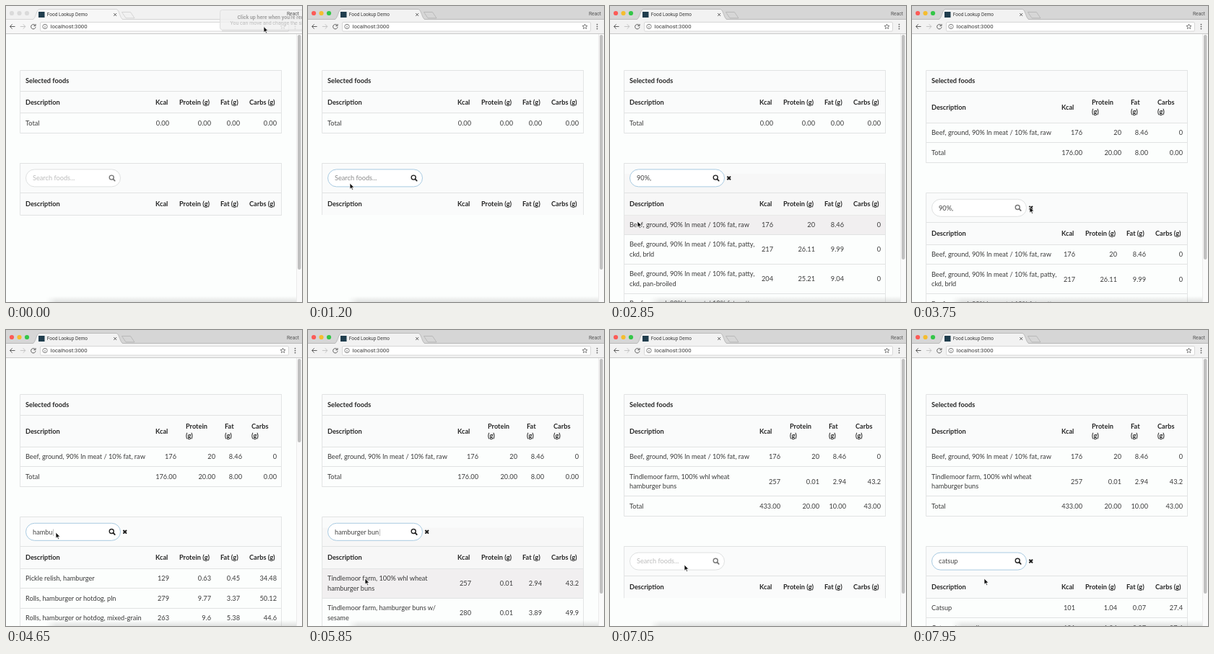
Write an HTML page that moves like this. It is 410x411 px and loops after 8 s.

```html
<!DOCTYPE html>
<html lang="en">
<head>
<meta charset="utf-8">
<title>Food Lookup Demo</title>
<style>
html, body { margin: 0; width: 100%; height: 100%; overflow: hidden; background: #fcfefd; }
svg { display: block; width: 410px; height: 411px; }
text { font: 9.2px Lato, sans-serif; fill: #3a3a3a; white-space: pre; }
text.b { font-weight: 700; fill: #262626; }
text.ui { font-family: Roboto, sans-serif; }
</style>
</head>
<body>
<svg id="stage" viewBox="0 0 410 411">
  <defs>
    <linearGradient id="dock" x2="0" y2="1">
      <stop offset="0" stop-color="#999" stop-opacity="0"/>
      <stop offset="1" stop-color="#999" stop-opacity=".28"/>
    </linearGradient>
    <linearGradient id="dockEdge">
      <stop offset="0" stop-color="#fcfefd"/>
      <stop offset="1" stop-color="#fcfefd" stop-opacity="0"/>
    </linearGradient>
  </defs>
  <g id="page"></g>
  <g id="dockShade">
    <rect x="55" y="403" width="347" height="8" fill="url(#dock)"/>
    <rect x="55" y="403" width="14" height="8" fill="url(#dockEdge)"/>
  </g>
  <g id="chrome"></g>
  <g id="note">
    <rect x="296.5" y="5.5" width="124" height="27.5" rx="3" fill="#f1f1f1" fill-opacity=".82" stroke="#dedede"/>
    <path d="M299 34.5H410" stroke="#000" stroke-opacity=".07" stroke-width="2"/>
    <text class="ui" x="320.5" y="18" style="font-size:7px;font-weight:700;fill:#a2a2a2">Click up here when you're ready</text>
    <text class="ui" x="310.5" y="26.3" style="font-size:7px;fill:#bcbcbc">You can move and change the size</text>
  </g>
  <text id="owner" class="ui" x="389" y="12.5" style="font-size:6.7px;fill:#555">React</text>
  <path id="cursor" d="M0 0V8.2L1.9 6.5 3.2 9.4 4.5 8.8 3.2 6H5.9Z" fill="#111" stroke="#fff" stroke-width=".7"/>
</svg>
<script>
const LOOP = 8000, STEP = 150;
const $ = id => document.getElementById(id);

const BEEF = "Beef, ground, 90% ln meat / 10% fat, ";
const foods = {
  beef: [
    [[BEEF + "raw"], "176", "20", "8.46", "0"],
    [[BEEF + "patty,", "ckd, brld"], "217", "26.11", "9.99", "0"],
    [[BEEF + "patty,", "ckd, pan-broiled"], "204", "25.21", "9.04", "0"],
    [[BEEF + "patty,", "raw"], "176", "20", "10", "0"]
  ],
  rolls: [
    [["Pickle relish, hamburger"], "129", "0.63", "0.45", "34.48"],
    [["Rolls, hamburger or hotdog, pln"], "279", "9.77", "3.37", "50.12"],
    [["Rolls, hamburger or hotdog, mixed-grain"], "263", "9.6", "5.38", "44.6"]
  ],
  buns: [
    [["Tindlemoor farm, 100% whl wheat", "hamburger buns"], "257", "0.01", "2.94", "43.2"],
    [["Tindlemoor farm, hamburger buns w/", "sesame"], "280", "0.01", "3.89", "49.9"]
  ],
  catsup: [
    [["Catsup"], "101", "1.04", "0.07", "27.4"],
    [["Catsup, low sodium"], "101", "1.04", "0.07", "27.4"]
  ]
};

const HEADS = ["Kcal", "Protein (g)", "Fat (g)", "Carbs (g)"];
const narrow = { left: [207, 240, 297, 337], right: [226, 284, 324, 375] };
const wide = { left: [207, 249, 303, 340], right: [236, 290, 327, 375] };
const LEAD = 13.4, LEFT = 19.5, RIGHT = 382;

// time, x, y of the pointer tip
const path = [
  [0, 357, 28.5], [150, 352, 36], [900, 60, 243], [1200, 58, 246], [2100, 58, 247],
  [2700, 38, 299], [3300, 38, 299], [3750, 163, 279], [3900, 163, 279], [4200, 69, 281],
  [5250, 69, 281], [5700, 79, 345], [6300, 79, 345], [6750, 163, 319], [6900, 163, 319],
  [7050, 103, 326], [7200, 92, 322], [7500, 92, 322], [7800, 100, 345], [8000, 100, 345]
];

// time, typed so far
const typing = [
  [0, ""], [1500, "9"], [1650, "90"], [1950, "90%"], [2100, "90%,"], [3900, ""],
  [4350, "ha"], [4500, "ham"], [4650, "hambu"], [4800, "hamburg"], [4950, "hamburger"],
  [5100, "hamburger b"], [5250, "hamburger bu"], [5400, "hamburger bun"], [6900, ""],
  [7350, "ca"], [7500, "cats"], [7650, "catsu"], [7800, "catsup"]
];

const within = (t, a, b) => t >= a && t < b;
const snap = y => Math.round(y - .5) + .5;
const rowHeight = n => 14 + LEAD * n;

function pointer(t) {
  const i = path.findLastIndex(p => p[0] <= t);
  const a = path[i], b = path[i + 1] || a;
  const u = a === b ? 0 : (t - a[0]) / (b[0] - a[0]);
  const e = u * u * (3 - 2 * u);
  return [a[1] + (b[1] - a[1]) * e, a[2] + (b[2] - a[2]) * e];
}

function resultsFor(q) {
  if (q.startsWith("90")) return foods.beef;
  if (q.startsWith("hamburger b")) return foods.buns;
  if (q.startsWith("ham")) return foods.rolls;
  if (q.startsWith("cat")) return foods.catsup;
  return [];
}

const text = (x, y, s, cls = "", extra = "") =>
  `<text x="${x}" y="${y + 3.2}" class="${cls}" ${extra}>${s}</text>`;
const box = (x, y, w, h, fill) =>
  `<rect x="${x}" y="${y}" width="${w}" height="${h}" fill="${fill}"/>`;
const line = (d, stroke, width = 1, extra = "") =>
  `<path d="${d}" fill="none" stroke="${stroke}" stroke-width="${width}" ${extra}/>`;
const rule = y => line(`M${LEFT} ${snap(y)}H${RIGHT}`, "#e1e3e3");
const band = (y, h, fill) => box(LEFT, y, RIGHT - LEFT, h, fill);
const sides = (a, b) => line(`M${LEFT} ${a}V${b}M${RIGHT - .5} ${a}V${b}`, "#e3e5e5");

// lines of text centred on y
const block = (x, y, lines, cls) =>
  lines.map((s, i) => text(x, y + (i - (lines.length - 1) / 2) * LEAD, s, cls)).join("");

const numbers = (y, values, cols) =>
  values.map((v, i) => text(cols.right[i], y, v, "", 'text-anchor="end"')).join("");

function heads(y, cols) {
  return text(27, y, "Description", "b") + HEADS.map((h, i) =>
    block(cols.left[i], y, cols === wide ? h.split(" ") : [h], "b")).join("");
}

function foodRow(y, [lines, ...values], cols) {
  const mid = y + rowHeight(lines.length) / 2;
  return block(27, mid, lines) + numbers(mid, values, cols);
}

function selectedTable(chosen, totals) {
  const cols = chosen.length ? wide : narrow;
  const headH = chosen.length ? 44 : 30;
  let y = 118.5;
  let out = band(89.5, 29 + headH, "#fafbfb") + rule(89.5) + rule(y) +
    text(27, 104, "Selected foods", "b") + heads(y + headH / 2, cols);
  y += headH;
  for (const food of chosen) {
    out += rule(y) + foodRow(y, food, cols);
    y += rowHeight(food[0].length);
  }
  out += rule(y) + text(27, y + 13.8, "Total") + numbers(y + 13.8, totals, cols);
  y += 28;
  return [out + rule(y) + sides(89.5, y), y];
}

function searchBox(y, query, focus, caret) {
  const tone = focus ? "#222" : "#777";
  const label = query || "Search foods...";
  const fill = query ? "#444" : focus ? "#8a8a8a" : "#bcbcbc";
  const bar = caret ? '<tspan style="font-weight:300">|</tspan>' : "";
  let out = `<rect x="27.5" y="${y - 12}" width="131" height="24" rx="12" fill="#fff" stroke="${focus ? "#a9cbe2" : "#dfe1e1"}"/>` +
    text(37, y, label + bar, "", `style="fill:${fill}"`) +
    `<circle cx="146.2" cy="${y - .8}" r="3" fill="none" stroke="${tone}" stroke-width="1.4"/>` +
    line(`M148.4 ${y + 1.4}l2.3 2.3`, tone, 1.8, 'stroke-linecap="round"');
  if (query) out += line(`M162.4 ${y - 2.3}l4.6 4.6m0 -4.6l-4.6 4.6`, "#1c1c1c", 2);
  return out;
}

function searchTable(top, t, query, py) {
  const rows = resultsFor(query);
  const focus = within(t, 1050, 3300) || within(t, 4200, 6300) || t >= 7200;
  const caret = within(t, 4200, 6300);
  const shaded = within(t, 2250, 3300) || within(t, 5400, 6300);
  const head = top + 41.3;
  let y = head + 30.6;
  let out = band(top, y - top, "#fafbfb");
  if (shaded) out += band(top + 15, y - top - 15, "#f7f7f7");
  out += rule(top) + searchBox(top + 20.7, query, focus, caret) +
    rule(head) + heads(head + 15, narrow);
  if (rows.length || t < 1050) out += rule(y);
  for (const food of rows) {
    const h = rowHeight(food[0].length);
    if (within(py, y, y + h)) out += band(y + .4, h, "#f1eff0");
    out += foodRow(y, food, narrow);
    y += h;
    out += rule(y);
  }
  return out + sides(top, y);
}

function scrollbar(query, rows) {
  const end = rows === foods.rolls || query === "9" ? 156 : rows === foods.beef ? 352 : 366;
  return box(402, 39, 8, 372, "#fafafa") + line("M402.5 39V411", "#ebebeb") +
    `<rect x="404" y="40" width="4.5" height="${end - 40}" rx="2.2" fill="#c0c0c0"/>`;
}

function chrome(active) {
  const dots = active ? ["#fc5b57", "#f5bd2f", "#34c648"] : ["#dadada", "#dadada", "#dadada"];
  const bar = active ? "#d6d6d6" : "#f1f1f1";
  const tool = active ? "#f2f2f2" : "#f7f7f7";
  const edge = active ? "#b3b3b3" : "#cfcfcf";
  const star = Array.from({ length: 10 }, (_, i) => {
    const r = i % 2 ? 1.6 : 3.7, a = i * Math.PI / 5;
    return `${383.5 + r * Math.sin(a)} ${28.7 - r * Math.cos(a)}`;
  }).join("L");
  return box(0, 0, 410, 19, bar) + box(0, 19, 410, 19, tool) +
    line("M0 18.5H410", edge, .8) + line("M0 38.5H410", "#c9c9c9") +
    dots.map((c, i) => `<circle cx="${8 + i * 10.5}" cy="10" r="3.1" fill="${c}"/>`).join("") +
    `<path d="M37 19C41 18 42 5 46 4.5H153C157 5 158 18 162 19Z" fill="${tool}"/>` +
    line("M37 18.5C41 18 42 5 46 4.5H153C157 5 158 18 162 18.5", edge, .8) +
    `<path d="M160.5 8.5H172.5L178 16.8H166Z" fill="${bar}" stroke="${edge}" stroke-width=".8"/>` +
    box(45, 8, 8.5, 8, "#1f3d4d") +
    text(56.7, 11.2, "Food Lookup Demo", "ui", 'style="font-size:6.5px"') +
    line("M149.2 10l4 4m0 -4l-4 4", "#555", .9) +
    line("M12.5 28.5H5.5M8.6 25.3L5.4 28.5L8.6 31.7", "#5c5c5c") +
    line("M19.8 28.5H26.8M23.7 25.3L26.9 28.5L23.7 31.7", "#c4c4c4") +
    line("M40.2 26.6A3.2 3.2 0 1 0 41 29.2M41 25V27.6H38.4", "#5c5c5c") +
    `<rect x="47.5" y="22.5" width="344" height="12.5" rx="1.5" fill="#fff" stroke="#d0d0d0" stroke-width=".8"/>` +
    `<circle cx="54" cy="28.5" r="3.2" fill="none" stroke="#666" stroke-width=".8"/>` +
    line("M54 28V30.4M54 26.4V27.2", "#666", .8) +
    text(61.5, 28, "localhost:3000", "ui", 'style="font-size:7.75px"') +
    line(`M${star}Z`, "#666", .8) +
    [25.6, 28.6, 31.6].map(y => `<circle cx="400.5" cy="${y}" r=".9" fill="#5c5c5c"/>`).join("");
}

function draw(t) {
  const [px, py] = pointer(t);
  const query = typing.findLast(k => k[0] <= t)[1];
  const chosen = [];
  let totals = ["0.00", "0.00", "0.00", "0.00"];
  if (t >= 3300) {
    chosen.push(foods.beef[0]);
    totals = ["176.00", "20.00", "8.00", "0.00"];
  }
  if (t >= 6300) {
    chosen.push(foods.buns[0]);
    totals = ["433.00", "20.00", "10.00", "43.00"];
  }
  const [top, bottom] = selectedTable(chosen, totals);
  $("page").innerHTML = box(0, 38, 410, 373, "#fcfefd") + top +
    searchTable(bottom + 41.7, t, query, py) + scrollbar(query, resultsFor(query));
  $("chrome").innerHTML = chrome(t >= 1050);
  $("note").setAttribute("opacity", Math.max(0, 1 - t / 300));
  $("cursor").setAttribute("transform", `translate(${px} ${py})`);
}

let start, shown = -1;
function tick(now) {
  start ??= now;
  const step = Math.floor(((now - start) % LOOP) / STEP);
  if (step !== shown) draw((shown = step) * STEP);
  requestAnimationFrame(tick);
}
draw(0);
requestAnimationFrame(tick);
</script>
</body>
</html>
```
